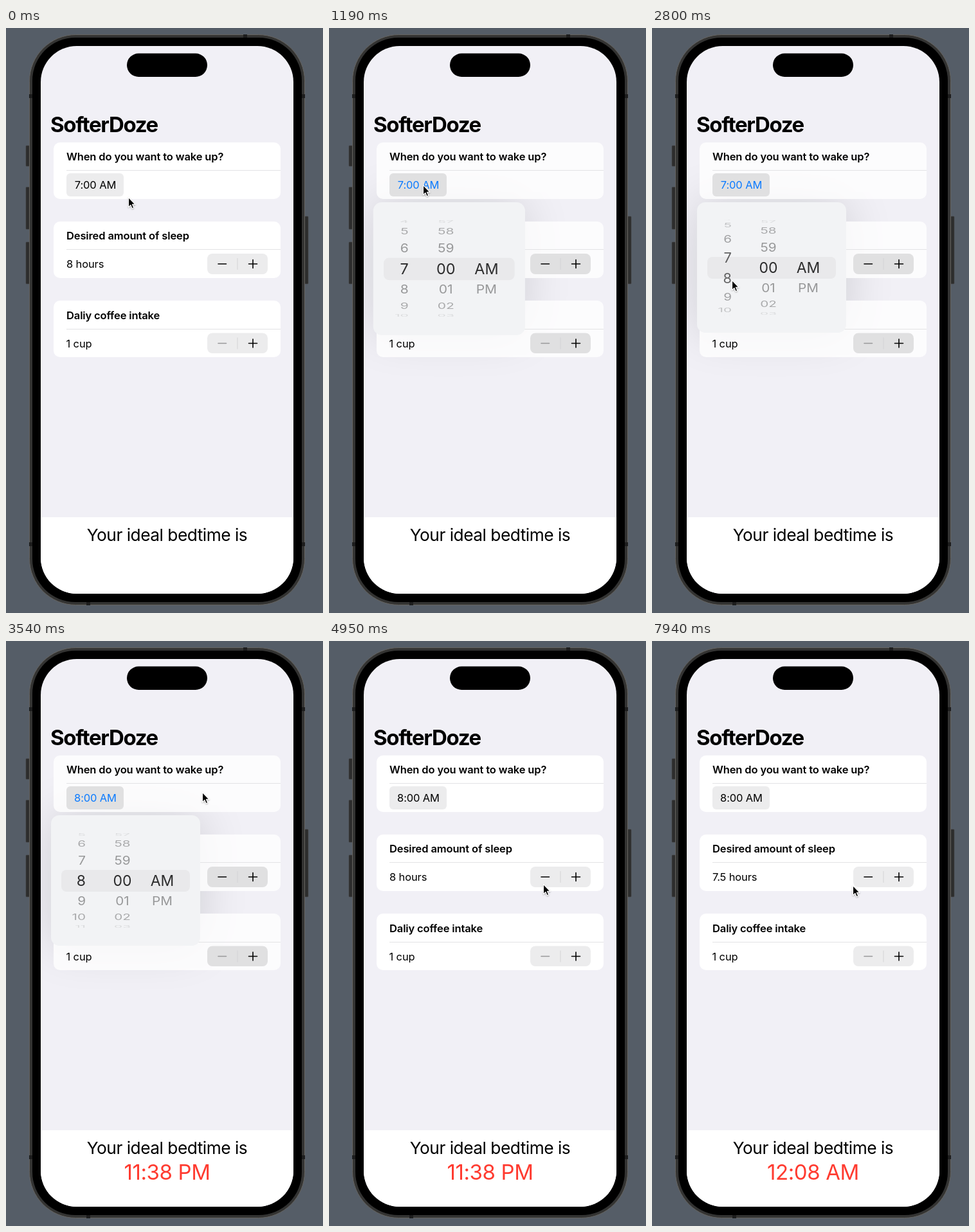
These frames come from a looping animation (493 by 910 pixels, 8000 ms). An HTML page:

```html
<!DOCTYPE html>
<html lang="en">
<head>
<meta charset="utf-8">
<title>Bedtime planner</title>
<style>
  html, body { margin: 0; width: 100%; height: 100%; overflow: hidden; background: #555d67; }
  svg { display: block; width: 100vw; height: 100vh; }
  text { font-family: Inter, "Open Sans", sans-serif; font-size: 16.5px; font-optical-sizing: none; letter-spacing: -.13px; }
  .title { font-size: 33px; font-weight: 700; letter-spacing: -1.35px; }
  .head { font-weight: 600; }
  .mid { text-anchor: middle; }
  .label { font-size: 26.3px; letter-spacing: -.5px; }
  .bed { font-size: 33px; letter-spacing: -.4px; fill: #ff3b30; }
  #wheel text { font-size: 23px; letter-spacing: 0; fill: #111; }
  .card { fill: #fff; }
  .rule { stroke: #e3e3e5; stroke-width: 1; }
  .sign { stroke: #000; stroke-width: 1.6; stroke-linecap: round; fill: none; }
</style>
</head>
<body>
<svg viewBox="0 0 493 910" preserveAspectRatio="none">
  <defs>
    <clipPath id="screen"><rect x="54" y="28" width="393" height="852" rx="56"/></clipPath>
    <filter id="blur" x="-1" y="-1" width="3" height="3"><feGaussianBlur stdDeviation="38"/></filter>
    <filter id="drop" x="-1" y="-1" width="3" height="3">
      <feDropShadow dx="0" dy="1" stdDeviation="1" flood-opacity=".35"/>
    </filter>
  </defs>

  <rect width="493" height="910" fill="#555d67"/>

  <g fill="#2d2d2d" stroke="#454545" stroke-width=".6">
    <rect x="31" y="183" width="6" height="32" rx="1"/>
    <rect x="31" y="247.500" width="6" height="65.500" rx="1"/>
    <rect x="31" y="333" width="6" height="65" rx="1"/>
    <rect x="464" y="293" width="6" height="105" rx="1"/>
  </g>
  <rect x="36.500" y="10.500" width="428" height="887" rx="72" fill="#333332" stroke="#65635f"/>
  <g fill="#1d1d1d">
    <rect x="369" y="10" width="6" height="6"/>
    <rect x="125" y="892" width="6" height="6"/>
    <rect x="36" y="103" width="6" height="6"/>
    <rect x="459" y="103" width="6" height="6"/>
    <rect x="36" y="800" width="6" height="6"/>
    <rect x="459" y="800" width="6" height="6"/>
  </g>
  <rect x="41" y="15" width="419" height="878" rx="67"/>

  <g clip-path="url(#screen)">
    <rect x="54" y="28" width="393" height="852" fill="#f1f0f6"/>
    <g id="shade" opacity="0">
      <rect x="70" y="271" width="232" height="203" rx="13" opacity=".14" filter="url(#blur)"/>
    </g>
    <text class="title" x="69" y="162">SofterDoze</text>

    <g id="cards">
      <rect class="card" x="74" y="178" width="353" height="88" rx="10"/>
      <rect class="card" x="74" y="301" width="353" height="88" rx="10"/>
      <rect class="card" x="74" y="424" width="353" height="88" rx="10"/>
    </g>
    <path class="rule" d="M94 221.500H427M94 344.500H427M94 468.500H427"/>

    <text class="head" x="94" y="206">When do you want to wake up?</text>
    <rect class="key" x="94" y="226" width="89" height="36" rx="6"/>
    <text class="mid" id="wake" x="139" y="250"></text>

    <text class="head" x="94" y="329">Desired amount of sleep</text>
    <text id="sleep" x="94" y="373"></text>
    <text class="head" x="94" y="452.500">Daliy coffee intake</text>
    <text x="93.500" y="496.500">1 cup</text>

    <rect class="key" x="313" y="351" width="94" height="32" rx="8"/>
    <path id="press" d="M321 351H360V383H321a8 8 0 0 1-8-8V359a8 8 0 0 1 8-8Z" fill="#d8d8da"/>
    <path d="M360 358V376M360 481.500V499.500" stroke="#d3d3d5"/>
    <path class="sign" d="M330 367H342.500M377.500 367H390.500M384 360.500V373.500"/>
    <rect class="key" x="313" y="474.500" width="94" height="31.500" rx="8"/>
    <path d="M360 481.500V499.500" stroke="#d3d3d5"/>
    <path class="sign" d="M377.500 490.500H390.500M384 484V497"/>
    <path class="sign" style="stroke:#98989a" d="M330 490.500H342.500"/>

    <rect x="54" y="761" width="393" height="119" fill="#fff"/>
    <text class="mid label" x="250.500" y="798">Your ideal bedtime is</text>
    <text class="mid bed" id="bed" x="250.500" y="838"></text>

    <g id="popup">
      <rect x="70" y="271" width="232" height="203" rx="13" fill="#f2f3f5"/>
      <rect x="86" y="356" width="200" height="34" rx="8" fill="#e9e9eb"/>
      <g id="wheel"></g>
    </g>
  </g>

  <rect x="188" y="39.500" width="125" height="36.500" rx="18.250"/>
  <path id="cursor" filter="url(#drop)" stroke="#fff" stroke-width="1.100" stroke-linejoin="round"
    d="M.5.5V15.600L3.900 12.400 6.200 17.700 8.700 16.600 6.400 11.400H11Z"/>
</svg>

<script>
const LOOP = 8000;
const $ = id => document.getElementById(id);

const bursts = [
  [150, 1190, 8], [1340, 2370, 8], [2520, 3540, 8], [3840, 4800, 8], [4950, 5250, 3],
  [5700, 5700, 1], [6000, 6290, 3], [6740, 6890, 2], [7940, 7940, 1]
];
const ticks = [0];
for (const [a, b, n] of bursts)
  for (let i = 0; i < n; i++) ticks.push(Math.floor(a + (b - a) * i / Math.max(1, n - 1) + .001));

// time, x, y of the pointer tip
const pointer = [
  [0, 190, 263], [740, 146, 244], [1340, 146, 244], [2220, 124, 392], [2800, 124, 392],
  [3540, 305, 235], [4110, 305, 235], [4660, 350, 372], [4800, 341, 376], [4950, 333, 378],
  [5250, 335, 369], [5600, 335, 369], [5700, 336, 369], [6000, 336, 367], [7930, 336, 367],
  [7940, 312, 380]
];
// time, scale, opacity of the picker
const picker = [
  [0, .2, 0], [880, .2, 0], [890, .35, .6], [1040, .86, 1], [1190, 1.018, 1], [1340, 1.005, 1],
  [1480, 1, 1], [3830, 1, 1], [3840, .97, 1], [3970, .65, .8], [4110, .25, .3], [4250, .2, 0]
];
const hour = [[0, 7], [2400, 7], [2950, 8]];
const press = [[0, 0], [5990, 0], [6000, 1], [6140, .5], [6290, 0], [6730, 0], [6740, 1], [6880, 0]];

// time, text
const wakeText = [[0, "7:00 AM"], [2950, "8:00 AM"]];
const sleepText = [[0, "8 hours"], [6000, "7.75 hours"], [6740, "7.5 hours"]];
const bedText = [[0, ""], [2950, "11:38 PM"], [6000, "11:53 PM"], [6740, "12:08 AM"]];

const mix = (a, b, p) => a + (b - a) * p;
const lastAt = (rows, t) => rows.filter(r => r[0] <= t).pop();

function track(rows, t) {
  const i = rows.findIndex(r => r[0] > t);
  if (i < 0) return rows[rows.length - 1].slice(1);
  const a = rows[i - 1], b = rows[i];
  const p = (t - a[0]) / (b[0] - a[0]);
  const e = p * p * (3 - 2 * p);
  return a.slice(1).map((v, j) => mix(v, b[j + 1], e));
}

const items = [];
function addItem(label, x, anchor, row, turns) {
  const el = document.createElementNS("http://www.w3.org/2000/svg", "text");
  el.textContent = label;
  el.setAttribute("text-anchor", anchor);
  el.setAttribute("y", 8.4);
  $("wheel").append(el);
  items.push({ el, x, row, turns });
}
for (let h = 4; h <= 11; h++) addItem(h, 124, "end", h, true);
for (let m = -3; m <= 3; m++) addItem(String((m + 60) % 60).padStart(2, "0"), 181, "middle", m);
addItem("AM", 243, "middle", 0);
addItem("PM", 243, "middle", 1);

// Rows sit on a cylinder seen from the front
const STEP = 25.2 * Math.PI / 180, RADIUS = 74, FADE = [.87, .4, .32, .1, 0, 0];
function turnWheel(h) {
  for (const { el, x, row, turns } of items) {
    const k = turns ? row - h : row, d = Math.abs(k), n = Math.floor(d);
    const size = 1 - .1 * Math.min(1, d);
    const y = 372.5 + RADIUS * Math.sin(k * STEP);
    const flat = Math.max(.01, Math.cos(k * STEP));
    el.setAttribute("transform", `translate(${x} ${y}) scale(${size} ${size * flat})`);
    el.setAttribute("opacity", mix(FADE[n], FADE[n + 1], d - n));
  }
}

const keys = document.querySelectorAll(".key");
function draw(now) {
  const t = ticks.filter(v => v <= now).pop();
  const [x, y] = track(pointer, t);
  const [scale, alpha] = track(picker, t);
  $("cursor").setAttribute("transform", `translate(${x} ${y})`);
  $("popup").setAttribute("transform", `translate(139 271) scale(${scale}) translate(-139 -271)`);
  $("popup").setAttribute("opacity", alpha);
  $("shade").setAttribute("opacity", alpha);
  $("cards").setAttribute("opacity", 1 - .18 * alpha);
  const tone = Math.round(mix(236, 224, alpha));
  keys.forEach(k => k.setAttribute("fill", `rgb(${tone},${tone},${tone + 1})`));
  $("press").setAttribute("opacity", track(press, t)[0]);
  turnWheel(track(hour, t)[0]);
  $("wake").textContent = lastAt(wakeText, t)[1];
  $("wake").setAttribute("fill", t >= 890 && t < 3840 ? "#0a7aff" : "#000");
  $("sleep").textContent = lastAt(sleepText, t)[1];
  $("bed").textContent = lastAt(bedText, t)[1];
}

const start = performance.now();
function frame() {
  draw((performance.now() - start) % LOOP);
  requestAnimationFrame(frame);
}
frame();
</script>
</body>
</html>
```
